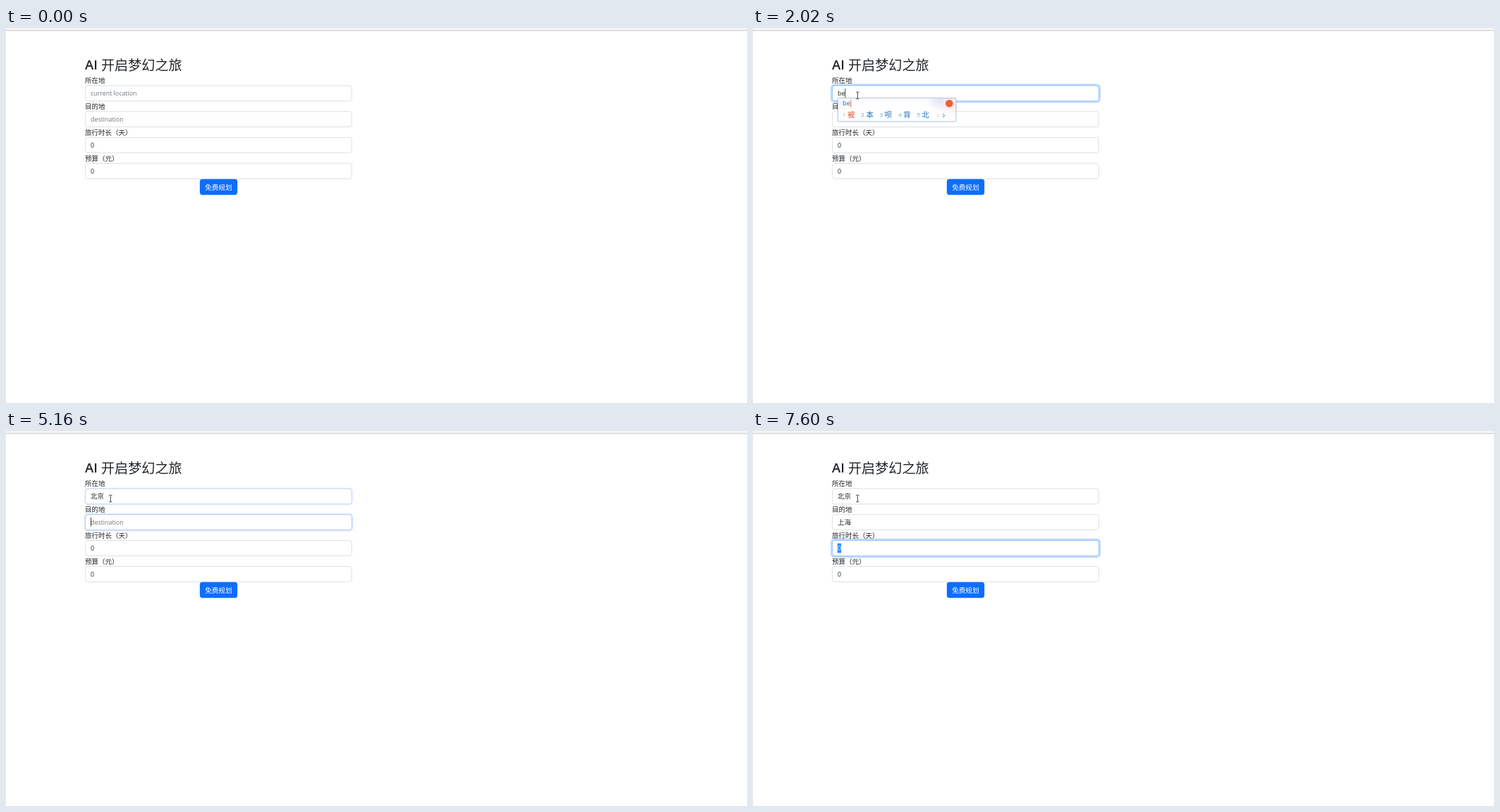
Recreate the animation shown at these times as an HTML page. Size 1051 by 533 pixels, loop 8000 ms.

```html
<!DOCTYPE html>
<html lang="zh">
<head>
<meta charset="utf-8">
<title>AI 开启梦幻之旅</title>
<style>
html, body { margin: 0; width: 100%; height: 100%; overflow: hidden; background: #fff; }
svg { display: block; width: 1051px; height: 533px; }
text { font-family: "Open Sans", "Noto Sans CJK SC", "Noto Sans CJK", sans-serif; white-space: pre; }
.zh { font-family: "Noto Sans CJK SC", "Noto Sans CJK", sans-serif; }
</style>
</head>
<body>
<svg id="stage" viewBox="0 0 1051 533" xmlns="http://www.w3.org/2000/svg">
  <defs>
    <radialGradient id="violet"><stop offset="0" stop-color="#e2e2fb"/><stop offset="1" stop-color="#e2e2fb" stop-opacity="0"/></radialGradient>
    <radialGradient id="pink"><stop offset="0" stop-color="#ffe3e3"/><stop offset="1" stop-color="#ffe3e3" stop-opacity="0"/></radialGradient>
  </defs>
  <g id="scene"></g>
</svg>
<script>
const LOOP = 8000, BLINK = 530, ROW = 36.83;
const INK = '#212529', BLUE = '#126ac2', RED = '#e2502c';
const scene = document.getElementById('scene');
const pen = document.createElement('canvas').getContext('2d');

// Focus moves between fields: [time, field]
const focusMoves = [[1003, 0], [5075, 1], [7452, 2]];

// Input method steps: [time, field, pinyin, candidates]
const keys = [
  [1420, 0, 'b', '吧 不 把 并 ∪'],
  [1820, 0, 'be', '被 本 呗 背 北'],
  [2220, 0, 'bei', '被 北 备 倍 背'],
  [2420, 0, "bei'j", '北京 背景 北极 北极星 被捐'],
  [2490, 0, "bei'ji", '北极 北极星 北极熊 北极圈 被挤'],
  [2640, 0, "bei'jin", '北京 背景音乐 被禁止的 被禁言了 北京人'],
  [2770, 0, "bei'jing", '北京 背景 被禁(jin) 倍镜 北境'],
  [4430, 0, '', ''],
  [5420, 1, 's', '是 说 三 上 岁'],
  [5490, 1, 'sh', '是 说 上 谁 事'],
  [5640, 1, 'sha', '啥 杀 沙 傻 纱'],
  [5720, 1, 'shan', '山 闪 善 删 扇'],
  [5800, 1, 'shang', '上 伤 商 尚 赏'],
  [5880, 1, "shang'h", '上海 伤害 商户 上火 商行'],
  [5960, 1, "shang'ha", '上海 伤害 上海市 商海 上哈'],
  [6110, 1, "shang'hai", '上海 上海人 上海话 上海市区 伤害了'],
  [6330, 1, '', '']
];

const clamp = v => Math.max(0, Math.min(1, v));
const smooth = v => { const p = clamp(v); return p * p * (3 - 2 * p); };
const mix = (a, b, p) => a + (b - a) * p;
const isZh = s => /[^\x00-\x7f]/.test(s);

function textWidth(s, size) {
  pen.font = `100px ${isZh(s) ? '"Noto Sans CJK SC"' : '"Open Sans", sans-serif'}`;
  return pen.measureText(s).width * size / 100;
}
const text = (s, x, y, size, fill, extra = '') =>
  `<text x="${x}" y="${y}" font-size="${size}" fill="${fill}" ${extra}>${s}</text>`;
const zh = (s, x, y, size, fill) => text(s, x, y, size, fill, 'class="zh"');
const rect = (x, y, w, h, fill, extra = '') =>
  `<rect x="${x}" y="${y}" width="${w}" height="${h}" fill="${fill}" ${extra}/>`;

function focusLevel(i, t) {
  const at = focusMoves.findIndex(m => m[1] === i);
  if (at < 0) return 0;
  const next = focusMoves[at + 1];
  return smooth((t - focusMoves[at][0]) / 150) - (next ? smooth((t - next[0]) / 150) : 0);
}

function fieldState(t) {
  const focus = focusMoves.filter(m => m[0] <= t).pop();
  const key = keys.filter(k => k[0] <= t).pop();
  const values = ['', '', '0', '0'];
  if (t >= 4430) values[0] = '北京';
  if (t >= 6330) values[1] = '上海';
  if (key && key[2]) values[key[1]] = key[2].replace("'", '');
  const last = Math.max(focus ? focus[0] : 0, key && focus && key[1] === focus[1] ? key[0] : 0);
  const caretOn = focus && Math.floor((t - last) / BLINK) % 2 === 0;
  return { active: focus ? focus[1] : -1, key, values, caretOn };
}

function drawField(i, t, state) {
  const y = 81.6 + ROW * i, mid = y + 11.25, p = focusLevel(i, t);
  const value = state.values[i], active = state.active === i;
  const channel = (a, b) => Math.round(mix(a, b, p));
  const border = `rgb(${channel(212, 134)},${channel(216, 183)},${channel(221, 254)})`;
  let out = '';
  if (p > 0) {
    const s = 2.4 * p;
    out += rect(112.3 - s, y - s, 378.5 + 2 * s, 22.5 + 2 * s, '#0d6efd', `rx="${3.6 + s}" fill-opacity="${0.25 * p}"`);
  }
  out += rect(112.6, y + 0.3, 377.9, 21.9, '#fff', `rx="3.4" stroke="${border}" stroke-width=".8"`);
  const selected = active && i === 2;
  if (selected) out += rect(119.8, mid - 6.8, 5.3, 13.6, '#2a8cff');
  const shown = value || ['current location', 'destination'][i];
  const color = selected ? '#d9ebff' : value ? INK : '#70777e';
  out += isZh(shown) ? zh(shown, 120, mid + 3.6, 9.5, color) : text(shown, 120, mid + 3.3, 8.9, color);
  if (active && state.caretOn && !selected) {
    const x = 120 + (value ? textWidth(value, isZh(value) ? 9.5 : 8.9) : 0);
    out += rect(x, mid - 6.6, 0.8, 12.6, '#111');
  }
  return out;
}

function drawPage(t, state) {
  const labels = ['所在地', '目的地', '旅行时长（天）', '预算（元）'];
  return rect(0, 0, 1051, 3.2, '#f5f5f5') + rect(0, 3.2, 1051, 1, '#c9c9c9')
    + text('AI', 112, 59.3, 18.6, INK, 'font-weight="600"')
    + zh('开启梦幻之旅', 135, 59.6, 19.1, INK)
    + labels.map((s, i) => zh(s, 112, 78.4 + ROW * i, 9.5, INK)).join('')
    + [0, 1, 2, 3].map(i => drawField(i, t, state)).join('')
    + rect(274.9, 214.7, 53.3, 22.5, '#0d6efd', 'rx="3.6"')
    + zh('免费规划', 282.2, 229.6, 9.6, '#fff');
}

function drawAutofill(t) {
  const p = clamp((t - 1080) / 130) * (1 - clamp((t - 1480) / 130));
  if (!p) return '';
  return `<g opacity="${p}">`
    + rect(112.8, 104.8, 236.2, 43.2, '#fff', 'rx="1.5" style="filter:drop-shadow(0 2px 4px rgba(0,0,0,.35))"')
    + zh('目', 112.5, 115.2, 9.5, '#e3eaf1')
    + text('germering', 120.6, 138.7, 7.2, '#343c46')
    + '<path d="M337.4 113l5 5m0-5l-5 5" stroke="#555" stroke-width=".9"/></g>';
}

function drawIme(t, key) {
  if (!key || !key[2]) return '';
  const [, field, pinyin, list] = key;
  const settled = field === 0 && t >= 2970;
  let x = 127, items = '';
  list.split(' ').forEach((word, i) => {
    if (i) x += 9;
    items += text(i + 1, x, 126.4, 7.8, i ? '#5b9ad6' : '#ef8468')
      + text(word, x + 7, 127, 10.4, i ? BLUE : RED);
    x += 7;
    for (const c of word) x += isZh(c) ? 10.4 : 3.7;
  });
  const right = x + 38;
  const caret = settled ? rect(173.8, 101, 0.9, 11.5, '#9b3b35')
    : rect(127.3 + textWidth(pinyin, 9.4), 102, 0.9, 10.6, '#f0642c');
  const chevron = (cx, d, color) =>
    `<path d="M${cx - d} 122l${2 * d} 2.5l${-2 * d} 2.5" fill="none" stroke="${color}" stroke-width="1"/>`;
  return `<g transform="translate(0 ${ROW * field})">`
    + rect(120.4, 99.6, right - 120.4, 33.4, '#fff', 'fill-opacity=".93"')
    + `<svg x="120.4" y="99.6" width="${right - 120.4}" height="33" overflow="hidden">`
    + `<ellipse cx="${right - 142}" cy="4" rx="21" ry="15" fill="url(#violet)"/>`
    + `<ellipse cx="${right - 125}" cy="8" rx="22" ry="18" fill="url(#pink)"/></svg>`
    + rect(120.4, 99.6, right - 120.4, 33.4, 'none', 'rx="1" stroke="#a5b9da" stroke-width=".9"')
    + text(pinyin, 127, 110.4, 9.4, BLUE) + caret
    + (settled ? '' : `<circle cx="${right - 9.6}" cy="107.2" r="5.3" fill="#ea6038"/>`)
    + items + chevron(x + 12.5, -1, '#ccd9e8') + chevron(x + 20.5, 1.2, BLUE) + '</g>';
}

function drawCursor(t) {
  if (t < 190) return '';
  // The pointer sweeps past the first field, then settles back into it
  const p = clamp(Math.floor((t - 190) / 68.18) / 11);
  const sweep = smooth(p / 0.72), back = smooth((p - 0.72) / 0.28);
  const x = mix(mix(734, 71, sweep), 148.3, back);
  const y = mix(mix(477, 108, sweep), 96, back);
  const overField = x > 112 && x < 491 && y > 81 && y < 215 && (y - 81.6) % ROW < 22.5;
  const beam = overField && !(t >= 1420 && t < 1620);
  if (beam) return `<path transform="translate(${x} ${y})" d="M-2.2-4.8H-.5L0-4.4.5-4.8H2.2M0-4.4V4.4M-2.2 4.8H-.5L0 4.4.5 4.8H2.2" fill="none" stroke="#222" stroke-width=".85"/>`;
  return `<path transform="translate(${x - 0.9} ${y - 0.6})" d="M0 0V10L2.3 7.9 3.9 11.3 5.5 10.6 4 7.3H7Z" fill="#fff" stroke="#111" stroke-width=".75"/>`;
}

let shown = '';
function render(t) {
  const state = fieldState(t);
  const markup = drawPage(t, state) + drawAutofill(t) + drawIme(t, state.key) + drawCursor(t);
  if (markup !== shown) scene.innerHTML = shown = markup;
}

const start = performance.now();
function tick() {
  render((performance.now() - start) % LOOP);
  requestAnimationFrame(tick);
}
tick();
</script>
</body>
</html>
```
